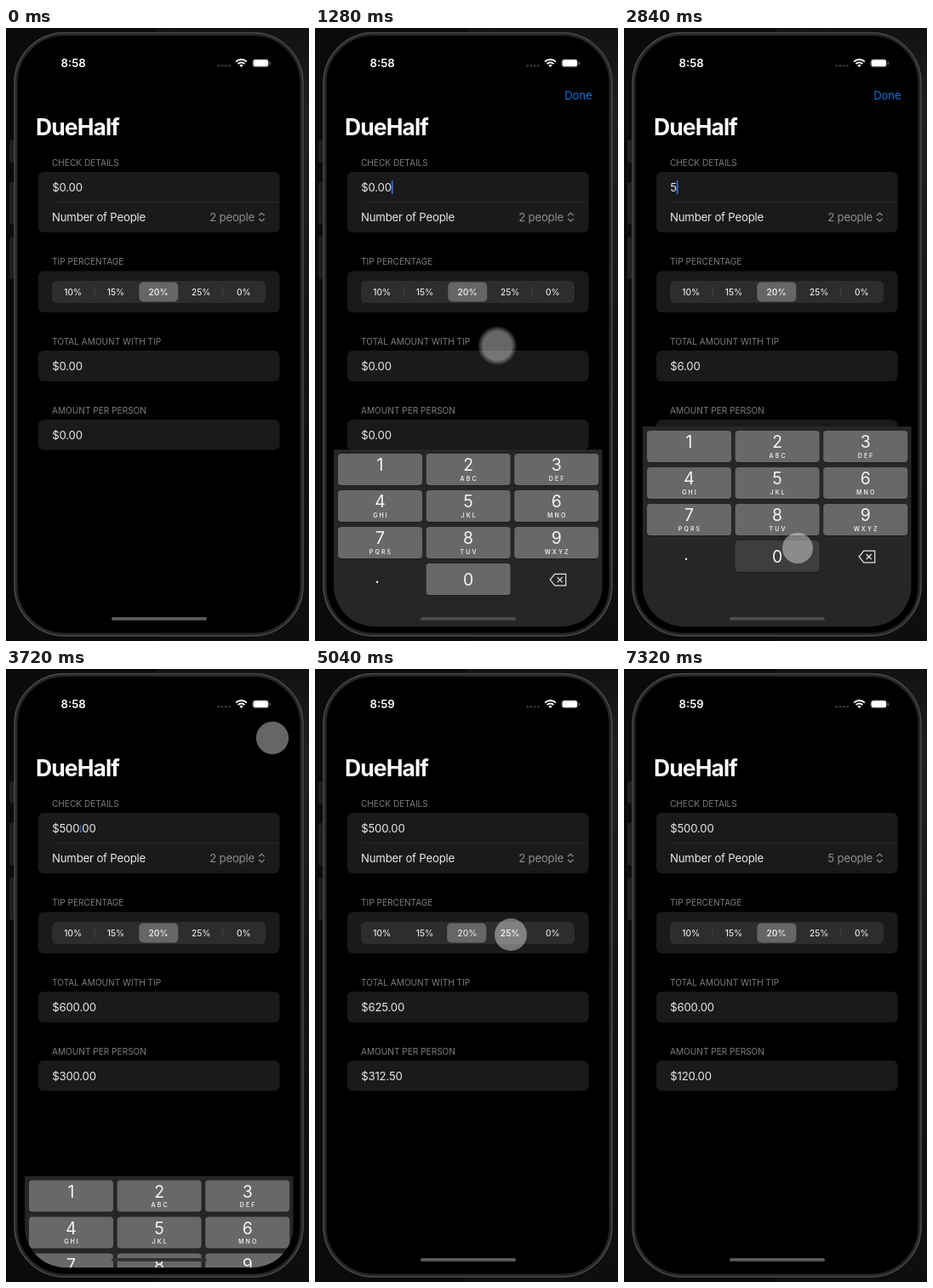
Animation, 356 px wide and 720 px high, one loop 7.56 s. Source, as an HTML page with a canvas:

```html
<!DOCTYPE html>
<html lang="en">
<head>
<meta charset="utf-8">
<title>Bill splitter</title>
<style>
html, body { margin: 0; width: 100%; height: 100%; overflow: hidden; background: #080808; }
canvas { display: block; width: 356px; height: 720px; }
</style>
</head>
<body>
<canvas id="stage"></canvas>
<script>
const W = 356, H = 720, LOOP = 7560, STEP = 40;
const canvas = document.getElementById('stage');
const c = canvas.getContext('2d');
const dpr = window.devicePixelRatio || 1;
canvas.width = W * dpr;
canvas.height = H * dpr;

// Timelines: [start ms, value]
const CLOCK = [[0, '8:58'], [4200, '8:59']];
const FIELD = [[0, '$0.00'], [1580, '$0.0'], [1700, '$0.'], [1820, '$0'], [1940, '$'], [2060, ''],
  [2520, '5'], [2900, '50'], [3140, '500'], [3627, '$500.00']];
const AMOUNT = [[0, 0], [2520, 5], [2900, 50], [3140, 500]];
const TIP = [[0, 2], [4320, 0], [4620, 1], [4950, 3], [6880, 2]];
const PEOPLE = [[0, 2], [6360, 5]];
const KEY = [[0, ''], [2400, '5'], [2520, ''], [2780, '0'], [2900, ''], [3020, '0'], [3140, '']];
const TAPS = [1020, 1580, 1700, 1820, 1940, 2060, 2400, 2780, 3020, 3570, 4240, 4540, 4900, 5580, 6280, 6800];
const RATES = [10, 15, 20, 25, 0];
const KEYS = ['1', '2ABC', '3DEF', '4GHI', '5JKL', '6MNO', '7PQRS', '8TUV', '9WXYZ', '.', '0', ''];
const KB_UP = 1072, KB_DOWN = 3627, MENU_OPEN = 5660, MENU_CLOSE = 6360;

// Pointer stops: [ms, x, y]
const PATH = [[480, 262, 470], [960, 166, 188], [1100, 166, 188], [1500, 285, 645], [2110, 286, 628],
  [2380, 186, 566], [2520, 186, 566], [2740, 204, 611], [3150, 204, 611], [3530, 313, 81], [3780, 313, 81],
  [4220, 82, 313], [4340, 82, 313], [4520, 132, 313], [4660, 132, 313], [4880, 230, 312], [5120, 230, 312],
  [5540, 270, 222], [5730, 270, 222], [6280, 198, 364], [6420, 198, 364], [6780, 180, 312],
  [6960, 180, 312], [7280, 236, 390]];

const clamp = v => Math.max(0, Math.min(1, v));
const ramp = (t, a, b) => clamp((t - a) / (b - a));
const mix = (a, b, p) => a + (b - a) * p;
const ease = p => p < .5 ? 2 * p * p : 1 - 2 * (1 - p) ** 2;
const grey = v => `rgb(${v},${v},${v})`;
const money = v => '$' + v.toFixed(2);

function spring(ms, w = 18.26) {
  const x = Math.max(0, ms) / 1000 * w;
  return 1 - (1 + x) * Math.exp(-x);
}
function indexAt(list, t) {
  let i = 0;
  while (i + 1 < list.length && list[i + 1][0] <= t) i++;
  return i;
}
const valueAt = (list, t) => list[indexAt(list, t)][1];

function box(x, y, w, h, r, fill) {
  c.beginPath();
  c.roundRect(x, y, w, h, r);
  c.fillStyle = fill;
  c.fill();
}
function ring(x, y, w, h, r, color, width) {
  c.beginPath();
  c.roundRect(x, y, w, h, r);
  c.strokeStyle = color;
  c.lineWidth = width;
  c.stroke();
}
function line(points, color, width = 1) {
  c.beginPath();
  points.forEach(([x, y], i) => i ? c.lineTo(x, y) : c.moveTo(x, y));
  c.strokeStyle = color;
  c.lineWidth = width;
  c.stroke();
}
function text(s, x, y, { size = 13.2, weight = 400, color = grey(232), align = 'left', track = -.19 } = {}) {
  c.font = `${weight} ${size}px Inter, "Liberation Sans", sans-serif`;
  c.letterSpacing = track + 'px';
  c.textAlign = align;
  c.fillStyle = color;
  c.fillText(s, x, y);
  return c.measureText(s).width;
}

function drawPhone() {
  c.fillStyle = grey(11);
  c.fillRect(0, 0, W, H);
  const glow = c.createLinearGradient(0, 0, 0, H);
  glow.addColorStop(0, grey(18));
  glow.addColorStop(.15, grey(32));
  glow.addColorStop(.5, grey(20));
  glow.addColorStop(1, grey(14));
  c.fillStyle = glow;
  c.fillRect(W / 2, 0, W / 2, H);
  [[132, 26], [181, 50], [245, 50]].forEach(([y, h]) => box(4, y, 6, h, 2, grey(31)));
  box(9, 4.5, 341, 710.5, 60, '#000');
  ring(11.5, 7, 336, 705.5, 57.5, grey(38), 4);
  ring(10, 5.5, 339, 708.5, 59, grey(72), 1.6);
}

function drawStatus(t) {
  text(valueAt(CLOCK, t), 64.5, 46, { weight: 600, color: '#fff', track: 0 });
  for (let i = 0; i < 4; i++) box(248.5 + i * 4.2, 43, 2.6, 2.6, 1.3, grey(62));
  c.strokeStyle = c.fillStyle = '#fff';
  c.lineWidth = 2;
  [5.5, 9].forEach(r => {
    c.beginPath();
    c.arc(276.5, 46, r, -Math.PI * .75, -Math.PI * .25);
    c.stroke();
  });
  c.beginPath();
  c.moveTo(276.5, 46);
  c.arc(276.5, 46, 3, -Math.PI * .75, -Math.PI * .25);
  c.fill();
  ring(289.5, 36.5, 19.5, 9.5, 3, grey(70), .8);
  box(290.5, 37.3, 17.6, 8, 2.2, '#fff');
  box(309.8, 39.6, 1.2, 3.4, .6, grey(100));
}

function drawTips(t) {
  const i = indexAt(TIP, t);
  const sel = TIP[i][1], old = TIP[Math.max(0, i - 1)][1];
  const p = i ? spring(t - TIP[i][0]) : 1;
  const centre = n => 79 + n * 50.15;
  box(54, 297, 251, 26, 6, '#2d2d30');
  for (let n = 0; n < 4; n++) {
    if (n === sel || n === sel - 1) continue;
    c.globalAlpha = p * p;
    c.fillStyle = grey(66);
    c.fillRect(centre(n) + 24.7, 304, 1, 12);
  }
  c.globalAlpha = 1;
  box(mix(centre(old), centre(sel), p) - 23, 298.5, 46, 23, 5, '#666669');
  RATES.forEach((r, n) => text(r + '%', centre(n) - .3, 313.7,
    { size: 10.1, weight: n === sel ? 600 : 500, align: 'center', track: 0 }));
}

function drawForm(t) {
  const amount = valueAt(AMOUNT, t), people = valueAt(PEOPLE, t);
  const total = amount * (1 + RATES[valueAt(TIP, t)] / 100);
  const card = '#1a1a1c';

  text('DueHalf', 35, 125.5, { size: 26.4, weight: 700, color: '#fff', track: -.85 });
  [['CHECK DETAILS', 158], ['TIP PERCENTAGE', 274], ['TOTAL AMOUNT WITH TIP', 368.5], ['AMOUNT PER PERSON', 449]]
    .forEach(([s, y]) => text(s, 54, y + 3.7, { size: 10.1, color: grey(126), track: 0 }));
  [[169, 71], [285.5, 48.5], [379, 36], [460, 35.5]].forEach(([y, h]) => box(38, y, 283.5, h, 6, card));

  line([[54, 204.5], [321.5, 204.5]], grey(38), .8);
  const width = text(valueAt(FIELD, t), 54.2, 191.8);
  if (t >= KB_UP && t < KB_DOWN) box(54.2 + width, 179, 1.7, 16, .8, '#3474e6');
  else if (t >= KB_DOWN && t < 3760) box(87, 183, 1.4, 9, .7, '#2a5cb4');

  text('Number of People', 54, 227);
  text(people + ' people', 292, 227, { align: 'right', color: grey(142) });
  line([[297, 220.2], [300.3, 217.2], [303.6, 220.2]], grey(142), 1.2);
  line([[297, 224], [300.3, 227], [303.6, 224]], grey(142), 1.2);

  drawTips(t);
  text(money(total), 54.2, 402);
  text(money(total / people), 54.2, 482.8);

  const done = ramp(t, KB_UP, KB_UP + 120) * (1 - ramp(t, KB_DOWN, KB_DOWN + 80));
  if (done > 0) {
    c.globalAlpha = done;
    text('Done', 325.4, 83.5, { align: 'right', color: '#0f74dc' });
    c.globalAlpha = 1;
  }
}

function drawBackspace(x, y) {
  line([[x - 9.5, y], [x - 4, y - 6.8], [x + 9, y - 6.8], [x + 9, y + 6.8], [x - 4, y + 6.8],
    [x - 9.5, y], [x - 4, y - 6.8]], grey(228), 1.2);
  line([[x - 1, y - 3], [x + 5, y + 3]], grey(228), 1.2);
  line([[x + 5, y - 3], [x - 1, y + 3]], grey(228), 1.2);
}

function drawKeyboard(t) {
  const shown = t < KB_DOWN ? spring(t - KB_UP) : 1 - spring(t - KB_DOWN);
  const drop = 252 * (1 - shown);
  const pressed = valueAt(KEY, t);
  c.save();
  c.beginPath();
  c.roundRect(22, 17, 315.5, 686, 48);
  c.clip();
  c.translate(0, drop);
  c.fillStyle = grey(38);
  c.fillRect(22, 468, 316, 260);
  KEYS.forEach((label, i) => {
    const x = 27 + i % 3 * 103.6, y = 473 + Math.floor(i / 3) * 43;
    const mid = x + 49.5, digit = label[0], letters = label.slice(1);
    if (!label) return drawBackspace(mid + 2, y + 19);
    if (digit !== '.') {
      box(x, y + 1, 99, 37, 4, grey(26));
      box(x, y, 99, 37, 4, grey(digit === pressed ? 62 : 104));
    }
    const base = digit === '0' ? 26 : digit === '.' ? 23 : 20;
    text(digit, mid - (digit === '.' ? 3.5 : 0), y + base,
      { size: 19.4, align: 'center', color: grey(245), track: 0 });
    text(letters, mid + 1, y + 31.6, { size: 7, weight: 600, align: 'center', track: 2.1 });
  });
  c.restore();
  return shown;
}

function drawHomeBar(t, shown) {
  const level = t > KB_DOWN && shown > .05 ? 48 : mix(92, 76, clamp(shown));
  box(124, 692, 112, 3.8, 1.9, grey(Math.round(level)));
}

function drawMenu(t) {
  const p = spring(t - MENU_OPEN, 26) * (1 - spring(t - MENU_CLOSE, 26));
  if (p < .01) return;
  const scale = mix(.25, 1, p);
  c.save();
  c.globalAlpha = clamp(p * 1.6);
  c.translate(290, 240.5);
  c.scale(scale, scale);
  c.translate(-290, -240.5);
  c.shadowColor = 'rgba(0,0,0,.4)';
  c.shadowBlur = 24 * dpr;
  box(105, 240.5, 200, 317, 9, '#222223');
  c.shadowBlur = 0;
  for (let i = 0; i < 9; i++) {
    const y = 258.2 + i * 35.3;
    if (i) line([[105, y - 17.6], [305, y - 17.6]], grey(48), .8);
    text(i + 2 + ' people', 130, y + 4.6);
  }
  line([[114.5, 258.5], [118, 262.5], [124.5, 253.5]], grey(235), 1.6);
  c.restore();
}

function drawPointer(t) {
  const alpha = ramp(t, 520, 680) * (1 - ramp(t, 7060, 7260));
  if (alpha <= 0) return;
  const i = Math.min(indexAt(PATH, t), PATH.length - 2);
  const [t0, x0, y0] = PATH[i], [t1, x1, y1] = PATH[i + 1];
  const p = ease(ramp(t, t0, t1));
  const x = mix(x0, x1, p), y = mix(y0, y1, p);
  const press = Math.max(...TAPS.map(s => ramp(t, s, s + 60) * (1 - ramp(t, s + 80, s + 260))));
  const moving = p > .02 && p < .98 && Math.hypot(x1 - x0, y1 - y0) > 60;
  const r = moving ? 23 : 21 - 3 * press;
  const fill = c.createRadialGradient(x, y, 0, x, y, r + .5);
  fill.addColorStop(0, 'rgba(255,255,255,.4)');
  fill.addColorStop(moving ? .72 : .95, 'rgba(255,255,255,.4)');
  fill.addColorStop(1, `rgba(255,255,255,${moving ? 0 : .32})`);
  c.globalAlpha = alpha;
  c.beginPath();
  c.arc(x, y, r, 0, Math.PI * 2);
  c.fillStyle = fill;
  c.fill();
  c.globalAlpha = 1;
}

const start = performance.now();
function frame() {
  const elapsed = (performance.now() - start) % LOOP;
  const t = Math.min(7320, Math.floor(elapsed / STEP) * STEP);
  c.setTransform(dpr, 0, 0, dpr, 0, 0);
  drawPhone();
  drawStatus(t);
  drawForm(t);
  const shown = drawKeyboard(t);
  drawHomeBar(t, shown);
  drawMenu(t);
  drawPointer(t);
  requestAnimationFrame(frame);
}
frame();
</script>
</body>
</html>
```
